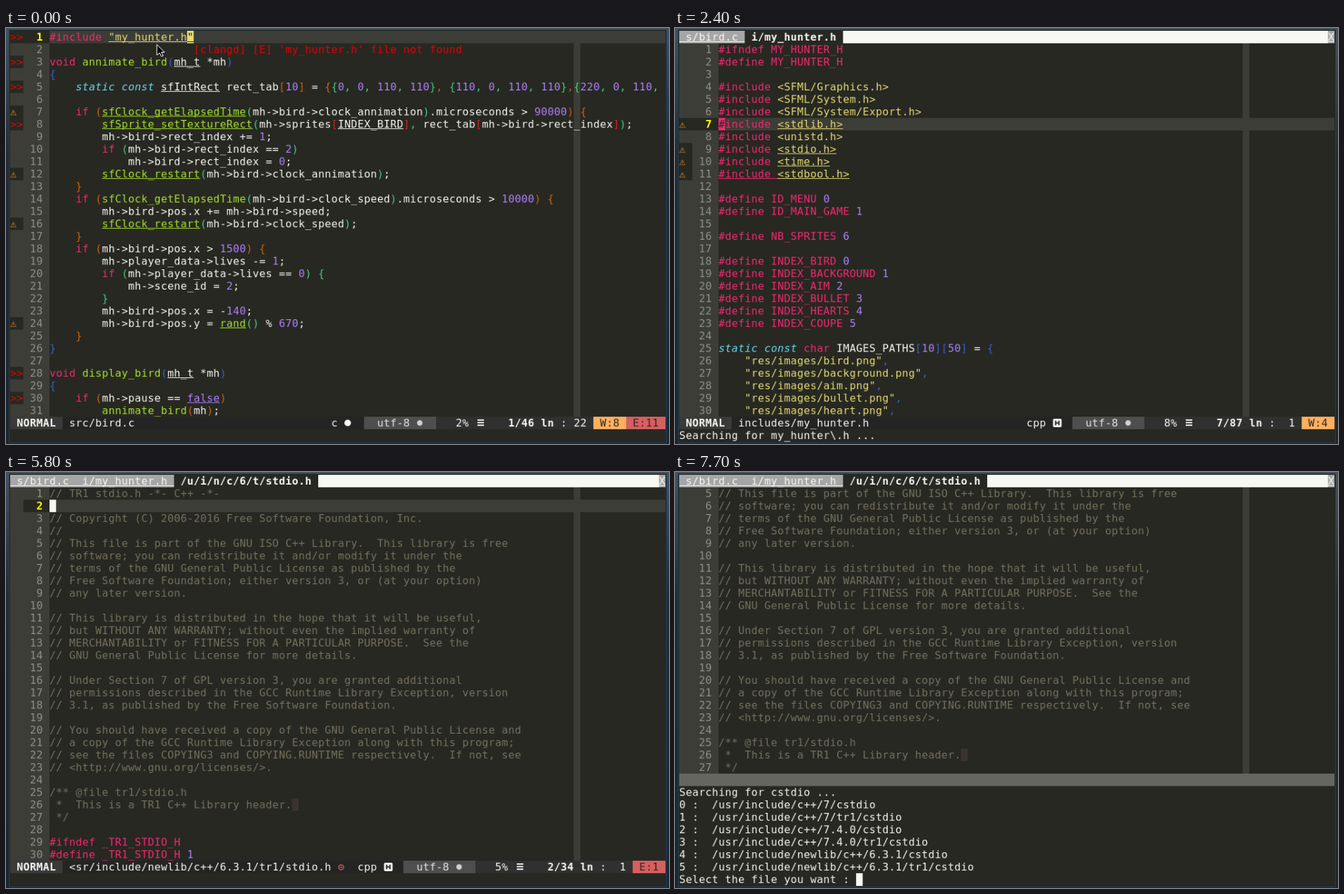
These frames come from a looping animation (945 by 593 pixels, 8 s). An HTML page with a canvas:

```html
<!DOCTYPE html>
<html lang="en">
<head>
<meta charset="utf-8">
<title>Editor session</title>
<style>
html, body { margin: 0; width: 100%; height: 100%; overflow: hidden; background: #2b3238; }
canvas { display: block; }
</style>
</head>
<body>
<canvas id="stage" width="945" height="593"></canvas>
<script>
const LOOP = 8000, CELL = 10, ROW = 19, BASELINE = 15, COLS = 100, ROWS = 33, GUTTER = 6;
const LEFT = 6, TOP = 4, SCALE = 0.934;
const STATUS_ROW = 31, COMMAND_ROW = 32;
const BG = '#272822', LINE = '#3c3d37', WHITE = '#f8f8f2', PINK = '#f92672', GREEN = '#a6e22e',
  YELLOW = '#e6db74', PURPLE = '#ae81ff', CYAN = '#66d9ef', COMMENT = '#75715e',
  RED = '#e60000', ORANGE = '#fd971f';
const RAINBOW = ['#3a5fcd', '#cd6600', '#43cd80', '#cd2626'];

// The terminal is drawn on a whole-pixel grid, then scaled onto the stage.
const stage = document.getElementById('stage').getContext('2d');
const terminal = document.createElement('canvas');
terminal.width = COLS * CELL;
terminal.height = ROWS * ROW;
const ctx = terminal.getContext('2d');

// A tilde switches underlining on and off.
const BIRD = `#include ~"my_hunter.h"~

void annimate_bird(~mh_t~ *mh)
{
    static const ~sfIntRect~ rect_tab[10] = {{0, 0, 110, 110}, {110, 0, 110, 110},{220, 0, 110, 110}};

    if (~sfClock_getElapsedTime~(mh->bird->clock_annimation).microseconds > 90000) {
        ~sfSprite_setTextureRect~(mh->sprites[~INDEX_BIRD~], rect_tab[mh->bird->rect_index]);
        mh->bird->rect_index += 1;
        if (mh->bird->rect_index == 2)
            mh->bird->rect_index = 0;
        ~sfClock_restart~(mh->bird->clock_annimation);
    }
    if (sfClock_getElapsedTime(mh->bird->clock_speed).microseconds > 10000) {
        mh->bird->pos.x += mh->bird->speed;
        ~sfClock_restart~(mh->bird->clock_speed);
    }
    if (mh->bird->pos.x > 1500) {
        mh->player_data->lives -= 1;
        if (mh->player_data->lives == 0) {
            mh->scene_id = 2;
        }
        mh->bird->pos.x = -140;
        mh->bird->pos.y = ~rand~() % 670;
    }
}

void display_bird(~mh_t~ *mh)
{
    if (mh->pause == ~false~)
        annimate_bird(mh);`;

const HUNTER = `#ifndef MY_HUNTER_H
#define MY_HUNTER_H

#include <SFML/Graphics.h>
#include <SFML/System.h>
#include <SFML/System/Export.h>
#include ~<stdlib.h>~
#include <unistd.h>
#include ~<stdio.h>~
#include ~<time.h>~
~#include <stdbool.h>~

#define ID_MENU 0
#define ID_MAIN_GAME 1

#define NB_SPRITES 6

#define INDEX_BIRD 0
#define INDEX_BACKGROUND 1
#define INDEX_AIM 2
#define INDEX_BULLET 3
#define INDEX_HEARTS 4
#define INDEX_COUPE 5

static const char IMAGES_PATHS[10][50] = {
    "res/images/bird.png",
    "res/images/background.png",
    "res/images/aim.png",
    "res/images/bullet.png",
    "res/images/heart.png",`;

const STDIO = `// TR1 stdio.h -*- C++ -*-

// Copyright (C) 2006-2016 Free Software Foundation, Inc.
//
// This file is part of the GNU ISO C++ Library.  This library is free
// software; you can redistribute it and/or modify it under the
// terms of the GNU General Public License as published by the
// Free Software Foundation; either version 3, or (at your option)
// any later version.

// This library is distributed in the hope that it will be useful,
// but WITHOUT ANY WARRANTY; without even the implied warranty of
// MERCHANTABILITY or FITNESS FOR A PARTICULAR PURPOSE.  See the
// GNU General Public License for more details.

// Under Section 7 of GPL version 3, you are granted additional
// permissions described in the GCC Runtime Library Exception, version
// 3.1, as published by the Free Software Foundation.

// You should have received a copy of the GNU General Public License and
// a copy of the GCC Runtime Library Exception along with this program;
// see the files COPYING3 and COPYING.RUNTIME respectively.  If not, see
// <http://www.gnu.org/licenses/>.

/** @file tr1/stdio.h
 *  This is a TR1 C++ Library header.\x20
 */

#ifndef _TR1_STDIO_H
#define _TR1_STDIO_H 1

#include ~<tr1/cstdio>~

#endif`;

function highlight(source) {
  let depth = 0;
  const level = d => RAINBOW[Math.max(0, d) % RAINBOW.length];
  const style = (token, next) => {
    if (token[0] === '"') return { fg: YELLOW };
    if (/^\d+$/.test(token)) return { fg: PURPLE };
    if (/^(static|const)$/.test(token)) return { fg: CYAN, italic: true };
    if (/^(if|void|char)$/.test(token)) return { fg: PINK };
    if (token === 'false') return { fg: PURPLE };
    if (/[([{]/.test(token)) return { fg: level(depth++) };
    if (/[)\]}]/.test(token)) return { fg: level(--depth) };
    if (token === ',') return { fg: level(depth - 1) };
    return { fg: /^\w/.test(token) && next === '(' ? GREEN : WHITE };
  };
  const directive = token =>
    ({ fg: /^[<"]/.test(token) ? YELLOW : /^\d+$/.test(token) ? PURPLE : PINK });

  return source.split('\n').map(raw => {
    const under = [];
    let text = '', on = false;
    for (const ch of raw) {
      if (ch === '~') on = !on;
      else { under.push(on); text += ch; }
    }
    const cells = [];
    const add = (token, look) => {
      for (const ch of token) cells.push({ ch, ...look, under: under[cells.length] });
    };
    if (/^(\/\/|\/\*| \*)/.test(text)) {
      add(text, { fg: COMMENT });
      if (text.endsWith(' ')) cells[cells.length - 1].bg = '#3a332d';
    } else {
      const hash = text[0] === '#';
      const pattern = hash ? /<.*>|".*"|\w+|./g : /"[^"]*"|\w+|./g;
      for (const m of text.matchAll(pattern))
        add(m[0], hash ? directive(m[0]) : style(m[0], text[m.index + m[0].length]));
    }
    return cells.slice(0, COLS - GUTTER);
  });
}

const files = {
  bird: { path: 'src/bird.c', type: 'c', total: 46, tabs: [], warn: [7, 12, 16, 24],
    error: [1, 3, 5, 8, 28, 30], counts: { W: 8, E: 11 }, lines: highlight(BIRD) },
  hunter: { path: 'includes/my_hunter.h', type: 'cpp', total: 87, tabs: ['s/bird.c', 'i/my_hunter.h'],
    warn: [7, 9, 10, 11], error: [], counts: { W: 4 }, lines: highlight(HUNTER) },
  stdio: { path: '<sr/include/newlib/c++/6.3.1/tr1/stdio.h', type: 'cpp', total: 34, readonly: true,
    tabs: ['s/bird.c', 'i/my_hunter.h', '/u/i/n/c/6/t/stdio.h'],
    warn: [], error: [32], counts: { E: 1 }, lines: highlight(STDIO) }
};

const INC = '/usr/include/';
const stdioList = ['c++/7/tr1/', 'c++/7.4.0/tr1/', 'newlib/c++/6.3.1/tr1/', 'newlib/', 'newlib/sys/', '', 'sys/']
  .map(dir => INC + dir + 'stdio.h');
const cstdioList = ['c++/7', 'c++/7/tr1', 'c++/7.4.0', 'c++/7.4.0/tr1', 'newlib/c++/6.3.1', 'newlib/c++/6.3.1/tr1']
  .map(dir => INC + dir + '/cstdio');

const goto = line => ({ line, shown: line });
const timeline = [
  [0, { file: 'bird', ...goto(1), col: 22, top: 1, mode: 'NORMAL', msg: '', list: null, prompt: true,
    input: '', cursor: true, signs: true, counts: true, mouse: true }],
  [500, { cursor: false }],
  [700, { mode: 'COMMAND', msg: 'Searching for my_hunter\\.h ...', mouse: false }],
  [800, { file: 'hunter', col: 1, signs: false, counts: false }],
  [900, { signs: true }],
  [1000, { mode: 'NORMAL', counts: true, cursor: true }],
  [1500, { line: 2 }], [1600, { shown: 2 }], [1700, { line: 3 }], [1800, { shown: 3 }],
  [2000, goto(4)], [2100, goto(5)], [2200, goto(6)], [2400, goto(7)],
  [3400, { ...goto(9), mode: 'COMMAND', msg: 'Searching for stdio\\.h ...', cursor: false }],
  [3500, { list: stdioList, cursor: true }],
  [4200, { cursor: false }],
  [4600, { input: '2', cursor: true }],
  [5100, { file: 'stdio', ...goto(1), list: null, input: '', msg: '', mode: 'NORMAL', counts: false }],
  [5200, { counts: true }],
  [5700, { line: 2 }], [5800, { shown: 2 }],
  [6000, goto(3)], [6100, goto(4)],
  [6300, { line: 34, top: 5, signs: false }], [6400, { shown: 34, signs: true }],
  [6800, goto(33)], [7000, goto(32)],
  [7500, { mode: 'COMMAND', msg: 'Searching for cstdio ...', cursor: false }],
  [7600, { list: cstdioList, prompt: false }],
  [7700, { prompt: true, cursor: true }]
];

function box(row, col, width, color) {
  ctx.fillStyle = color;
  ctx.fillRect(col * CELL, row * ROW, width * CELL, ROW);
}

function put(row, col, text, { fg = WHITE, bg, bold, italic, under } = {}) {
  if (bg) box(row, col, text.length, bg);
  ctx.font = `${italic ? 'italic ' : ''}${bold ? 'bold ' : ''}16px "DejaVu Sans Mono", monospace`;
  ctx.fillStyle = fg;
  [...text].forEach((ch, i) => {
    if (ch !== ' ') ctx.fillText(ch, (col + i) * CELL, row * ROW + BASELINE);
  });
  if (under) ctx.fillRect(col * CELL, row * ROW + BASELINE + 1, text.length * CELL, 1);
}

const putEnd = (row, end, text, look) => put(row, end - text.length, text, look);

function disc(x, y, r, color) {
  ctx.beginPath();
  ctx.arc(x, y, r, 0, Math.PI * 2);
  ctx.fillStyle = color;
  ctx.fill();
}

function drawTabs(tabs) {
  box(0, 0, COLS, WHITE);
  let col = 0;
  tabs.forEach((name, i) => {
    const active = i === tabs.length - 1, label = ` ${name} `;
    put(0, col, label, { bg: active ? BG : '#a6a6a6', bold: active, under: !active });
    col += label.length;
  });
  put(0, COLS - 1, 'X', { bg: '#a6a6a6', under: true });
}

function drawText(s, file) {
  const first = file.tabs.length ? 1 : 0;
  for (let row = first; row < STATUS_ROW; row++) {
    const n = s.top + row - first, current = n === s.line;
    box(row, 0, GUTTER, LINE);
    if (current) {
      box(row, 2, GUTTER - 2, BG);
      box(row, GUTTER, COLS - GUTTER, LINE);
    }
    box(row, GUTTER + 80, 1, LINE);
    if (s.signs && file.error.includes(n)) put(row, 0, '>>', { fg: RED, bg: BG });
    if (s.signs && file.warn.includes(n)) put(row, 0, '⚠ ', { fg: ORANGE, bg: BG });
    putEnd(row, 5, String(n), { fg: current ? '#ffff00' : '#90908a', bold: current });
    const cells = file.lines[n - 1] || [];
    cells.forEach((cell, i) => put(row, GUTTER + i, cell.ch, cell));
    if (current && s.cursor && !s.list) {
      const cell = cells[s.col - 1] || { ch: ' ', fg: WHITE };
      put(row, GUTTER + s.col - 1, cell.ch, { ...cell, fg: BG, bg: cell.fg });
    }
  }
  if (s.file === 'bird') put(1, 28, "[clangd] [E] 'my_hunter.h' file not found", { fg: RED });
}

function drawReadonly(x, y) {
  ctx.strokeStyle = '#d75f5f';
  ctx.lineWidth = 1.4;
  ctx.beginPath();
  ctx.arc(x, y, 3.8, 0, Math.PI * 2);
  ctx.moveTo(x - 2, y);
  ctx.lineTo(x + 2, y);
  ctx.stroke();
}

function drawHeaderIcon(x, y) {
  ctx.fillStyle = WHITE;
  ctx.beginPath();
  ctx.roundRect(x, y - 6.5, 13, 13, 2);
  ctx.fill();
  ctx.fillStyle = '#242424';
  ctx.fillRect(x + 3, y - 3.5, 2, 7);
  ctx.fillRect(x + 8, y - 3.5, 2, 7);
  ctx.fillRect(x + 4, y - 1, 5, 2);
}

function drawStatus(s, file) {
  const row = STATUS_ROW, mid = (row + .5) * ROW;
  const badges = s.counts ? Object.entries(file.counts).map(([k, v]) => ` ${k}:${v} `) : [];
  const end = COLS - badges.join('').length, pos = end - 24, enc = pos - 11;

  box(row, 0, COLS, '#242424');
  put(row, 0, ` ${s.mode} `, { bold: true, bg: '#3a3a3a' });
  put(row, s.mode.length + 3, file.path);
  if (file.readonly) drawReadonly(50 * CELL + 5, mid + .5);
  putEnd(row, enc - 4, file.type);
  const iconX = (enc - 3) * CELL;
  if (file.type === 'c') disc(iconX + 5, mid, 5, WHITE);
  else drawHeaderIcon(iconX + .5, mid);

  put(row, enc, '  utf-8    ', { bg: '#4e4e4e', fg: '#e4e4e4' });
  disc((enc + 8) * CELL + 5, mid, 4.2, '#d0d0d0');

  box(row, pos, 24, '#303030');
  putEnd(row, pos + 5, Math.floor(s.shown * 100 / file.total) + '%');
  ctx.fillStyle = WHITE;
  for (const dy of [-5, -1, 3]) ctx.fillRect((pos + 6) * CELL + 3, mid + dy - .5, 10, 2);
  putEnd(row, pos + 15, `${s.shown}/${file.total}`, { bold: true });
  put(row, pos + 16, 'ln', { bold: true });
  put(row, pos + 19, ':');
  putEnd(row, pos + 23, String(s.col));

  let col = end;
  for (const label of badges) {
    put(row, col, label, { fg: BG, bg: label[1] === 'W' ? '#ffaf5f' : '#d75f5f' });
    col += label.length;
  }
}

function drawMessages(s) {
  if (!s.list) return put(COMMAND_ROW, 0, s.msg);
  const band = COMMAND_ROW - s.list.length - 2;
  for (let row = band; row <= COMMAND_ROW; row++) box(row, 0, COLS, row === band ? '#65665f' : BG);
  put(band + 1, 0, s.msg);
  s.list.forEach((path, i) => put(band + 2 + i, 0, `${i} :  ${path}`));
  if (!s.prompt) return;
  const prompt = 'Select the file you want : ' + s.input;
  put(COMMAND_ROW, 0, prompt);
  if (s.cursor) box(COMMAND_ROW, prompt.length, 1, WHITE);
}

function drawWindow() {
  const desktop = stage.createLinearGradient(0, 0, 0, 593);
  desktop.addColorStop(0, '#46525c');
  desktop.addColorStop(.3, '#232b31');
  desktop.addColorStop(1, '#1d252b');
  stage.fillStyle = desktop;
  stage.fillRect(0, 0, 945, 593);
  stage.fillStyle = BG;
  stage.fillRect(5, 3, 936, 588);
  stage.strokeStyle = '#1c4060';
  stage.lineWidth = 1;
  stage.strokeRect(4.5, 2.5, 937, 589);
  stage.imageSmoothingQuality = 'high';
  stage.drawImage(terminal, LEFT, TOP, terminal.width * SCALE, terminal.height * SCALE);
}

function drawMouse(x, y) {
  const arrow = [[0, 0], [0, 15], [4, 12], [6.5, 17], [9, 16], [6.5, 11], [11, 11]];
  stage.beginPath();
  arrow.forEach(([dx, dy]) => stage.lineTo(x + dx, y + dy));
  stage.closePath();
  stage.fillStyle = '#000';
  stage.fill();
  stage.strokeStyle = '#fff';
  stage.stroke();
}

function draw(s) {
  const file = files[s.file];
  ctx.fillStyle = BG;
  ctx.fillRect(0, 0, terminal.width, terminal.height);
  if (file.tabs.length) drawTabs(file.tabs);
  drawText(s, file);
  drawStatus(s, file);
  drawMessages(s);
  drawWindow();
  if (s.mouse) drawMouse(215, 23.5);
}

let lastStep = 0;
function tick() {
  const t = performance.now() % LOOP;
  const steps = timeline.filter(([at]) => at <= t);
  if (steps.length !== lastStep) {
    lastStep = steps.length;
    draw(Object.assign({}, ...steps.map(([, change]) => change)));
  }
  requestAnimationFrame(tick);
}
tick();
</script>
</body>
</html>
```
